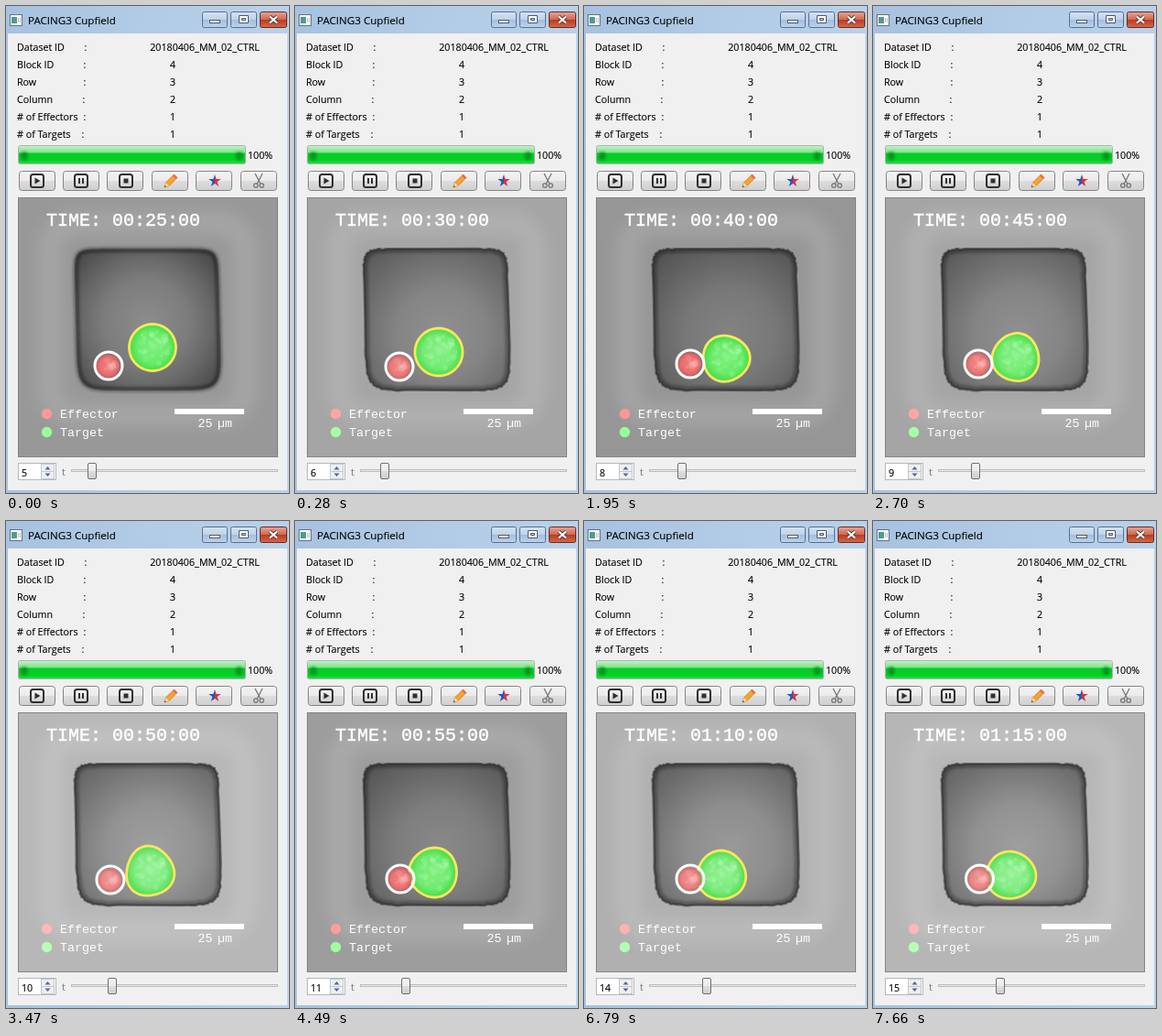
Animation, 309 px wide and 532 px high, one loop 8 s. Source, as an HTML page:

```html
<!DOCTYPE html>
<html lang="en">
<head>
<meta charset="utf-8">
<title>Cell viewer</title>
<style>
  html, body { margin: 0; width: 100%; height: 100%; overflow: hidden; background: #b3cbe6; }
  svg { display: block; }
  .ui { font: 10.7px "Open Sans", "Noto Sans", sans-serif; fill: #000; stroke: #000; stroke-width: .12; }
  .mono { font: 13.3px "Liberation Mono", "Courier New", monospace; fill: #fff; }
  .mid { text-anchor: middle; }
</style>
</head>
<body>
<svg id="stage" width="309" height="532" viewBox="0 0 309 532">
  <defs>
    <linearGradient id="bar"><stop stop-color="#a6c2e0"/><stop offset=".5" stop-color="#b2cbe6"/><stop offset="1" stop-color="#b9d1ea"/></linearGradient>
    <linearGradient id="cap" x2="0" y2="1"><stop stop-color="#d5e3f2"/><stop offset=".48" stop-color="#bfd2e8"/><stop offset=".5" stop-color="#a3bddb"/><stop offset="1" stop-color="#bcd3ec"/></linearGradient>
    <linearGradient id="close" x2="0" y2="1"><stop stop-color="#e3a596"/><stop offset=".48" stop-color="#cf6a53"/><stop offset=".5" stop-color="#b93a20"/><stop offset="1" stop-color="#d3694a"/></linearGradient>
    <linearGradient id="btn" x2="0" y2="1"><stop stop-color="#f3f3f3"/><stop offset=".48" stop-color="#ebebeb"/><stop offset=".5" stop-color="#dddddd"/><stop offset="1" stop-color="#cfcfcf"/></linearGradient>
    <linearGradient id="fill" x2="0" y2="1"><stop stop-color="#c4f3c9"/><stop offset=".38" stop-color="#7ce388"/><stop offset=".42" stop-color="#06cb25"/><stop offset=".8" stop-color="#04d127"/><stop offset="1" stop-color="#2fda4b"/></linearGradient>
    <radialGradient id="sharp" gradientUnits="userSpaceOnUse" cx="160" cy="358" r="122"><stop stop-opacity=".13"/><stop offset=".4" stop-opacity=".2"/><stop offset=".7" stop-opacity=".34"/><stop offset="1" stop-opacity=".48"/></radialGradient>
    <radialGradient id="soft" gradientUnits="userSpaceOnUse" cx="153" cy="345" r="102"><stop stop-opacity=".08"/><stop offset=".45" stop-opacity=".18"/><stop offset=".7" stop-opacity=".32"/><stop offset="1" stop-opacity=".52"/></radialGradient>
    <radialGradient id="red"><stop id="redIn"/><stop offset=".7" id="redMid"/><stop offset="1" id="redOut"/></radialGradient>
    <radialGradient id="green"><stop id="greenIn"/><stop offset=".7" id="greenMid"/><stop offset="1" id="greenOut"/></radialGradient>
    <filter id="blur" x="-20%" y="-20%" width="140%" height="140%"><feGaussianBlur stdDeviation="8"/></filter>
    <filter id="haze" x="-20%" y="-20%" width="140%" height="140%"><feGaussianBlur stdDeviation="1.6"/></filter>
    <filter id="fuzz" x="-20%" y="-20%" width="140%" height="140%"><feGaussianBlur stdDeviation=".7"/></filter>
    <clipPath id="view"><rect x="14" y="210" width="282" height="282"/></clipPath>
    <clipPath id="inside"><path id="cut"/></clipPath>
  </defs>

  <!-- window -->
  <rect width="309" height="532" fill="url(#bar)"/>
  <rect x="2" y="30" width="305" height="499" fill="#f0f0f0"/>
  <rect x="4.5" y="9.5" width="13" height="12" fill="#fdfdfd" stroke="#66707a"/>
  <rect x="6" y="12" width="6" height="7" fill="#4f9a94"/>
  <path d="M13.500 13v5M15.500 13v5" stroke="#b4bcc4"/>
  <text class="ui" x="24" y="20" style="font-size:11.6px">PACING3 Cupfield</text>
  <g stroke="#56708d">
    <rect x="214.5" y="6.5" width="27" height="17" rx="2" fill="url(#cap)"/>
    <rect x="245.5" y="6.5" width="28" height="17" rx="2" fill="url(#cap)"/>
    <rect x="277.5" y="6.5" width="29" height="17" rx="2" fill="url(#close)" stroke="#6b2a20"/>
  </g>
  <rect x="222.5" y="15.5" width="11" height="3" fill="#fff" stroke="#4d5a68"/>
  <path d="M254.500 10.500h10v8h-10zM257.500 13.500h4v2h-4z" fill="#fff" fill-rule="evenodd" stroke="#4d5a68"/>
  <path d="M288 11.500l8 7m0-7l-8 7" stroke="#5b3030" stroke-width="4"/>
  <path d="M288 11.500l8 7m0-7l-8 7" stroke="#fff" stroke-width="2.300"/>

  <g id="info"></g>

  <!-- progress -->
  <rect x="13.500" y="152.500" width="248" height="20" rx="2" fill="url(#fill)" stroke="#b2b2b2"/>
  <g fill="#067d18" opacity=".65" filter="url(#haze)">
    <ellipse cx="20" cy="164" rx="4" ry="5"/><ellipse cx="254.500" cy="164" rx="4" ry="5"/>
  </g>
  <text class="ui" x="264" y="167">100%</text>

  <g id="buttons"></g>
  <g fill="none" stroke="#303030" stroke-width="2">
    <rect x="27" y="184" width="14" height="14" rx="2.500"/>
    <rect x="75" y="184" width="14" height="14" rx="2.500"/>
    <rect x="124" y="184" width="14" height="14" rx="2.500"/>
  </g>
  <path d="M31.500 187.500l6 3.500-6 3.500zM79 188h2v6h-2zM83 188h2v6h-2zM128.500 188.500h5v5h-5z" fill="#303030"/>
  <path d="M173 198l1.500-5 9-9 3.500 3.500-9 9z" fill="#f5a42c" stroke="#c9751a" stroke-width=".8"/>
  <path d="M182 185.500l1.500-1.500 3.500 3.500-1.500 1.500z" fill="#e8685a"/>
  <path d="M173 198l1.500-5 3.500 3.500z" fill="#f3d9a8"/>
  <path d="M173 198l.600-2 1.400 1.400z" fill="#333"/>
  <path d="M228 184l1.600 5h5.200l-4.200 3.100 1.600 5-4.200-3.100z" fill="#d8323c"/>
  <path d="M228 184l-1.600 5h-5.200l4.200 3.100-1.600 5 4.200-3.100z" fill="#2457b8"/>
  <g fill="none" stroke="#777" stroke-width="1.300">
    <path d="M272 183l6 11.500M280 183l-6 11.500"/>
    <circle cx="272.800" cy="196" r="2.200"/><circle cx="279.200" cy="196" r="2.200"/>
  </g>

  <!-- microscope view -->
  <rect x="13.500" y="209.500" width="283" height="283" fill="#999" stroke="#858585"/>
  <g clip-path="url(#view)">
    <rect id="field" x="14" y="210" width="282" height="282"/>
    <rect x="48" y="237" width="213" height="210" rx="28" fill="none" stroke="#fff" stroke-opacity=".12" stroke-width="26" filter="url(#blur)"/>
    <path id="well"/>
    <g clip-path="url(#inside)">
      <path id="shade" fill="none" stroke="#000" stroke-opacity=".28" stroke-width="9" filter="url(#haze)"/>
    </g>
    <path id="edge" fill="none" stroke="#262626"/>
    <g id="target">
      <path id="tbody" fill="url(#green)"/>
      <g id="tspots" fill="#d5ffd5" filter="url(#fuzz)"></g>
      <path id="tring" fill="none" stroke="#f7e85c" stroke-width="2.800"/>
    </g>
    <g id="effector">
      <circle r="12.800" cx="-.5" cy=".3" fill="url(#red)"/>
      <g id="espots" fill="#ffd0d0" filter="url(#fuzz)"></g>
      <circle r="15" fill="none" stroke="#fff" stroke-width="3"/>
    </g>
    <circle id="edot" cx="44.500" cy="445.500" r="5.700"/>
    <circle id="tdot" cx="44.500" cy="465.500" r="5.700"/>
    <text class="mono" x="59" y="450">Effector</text>
    <text class="mono" x="59" y="470">Target</text>
    <rect x="184" y="440" width="76" height="6" fill="#fff"/>
    <text class="mono" x="209.500" y="460">25</text><text class="mono" x="231" y="460">µm</text>
    <text class="mono" id="clock" x="44" y="240" style="font-size:20px;stroke:#fff;stroke-width:.45"></text>
  </g>

  <!-- frame spinner and slider -->
  <rect x="13.500" y="499.500" width="41" height="18" fill="#fff" stroke="#b4b8be"/>
  <g fill="#efefef" stroke="#c3c7cc"><rect x="38.500" y="500.500" width="14" height="8"/><rect x="38.500" y="508.500" width="14" height="8"/></g>
  <path d="M42.500 506.500l3-3.500 3 3.500zM42.500 510.500l3 3.500 3-3.500z" fill="#5068a0"/>
  <text class="ui" id="count" x="17" y="513.500"></text>
  <text class="ui" x="61" y="513" style="fill:#66758c;stroke:none">t</text>
  <rect x="71.500" y="506.500" width="225" height="2" fill="#e7eaea" stroke="#bcbcbc"/>
  <rect id="thumb" y="499.500" width="9" height="17" rx="1.500" fill="url(#btn)" stroke="#6e6e6e"/>
</svg>
<script>
const $ = id => document.getElementById(id);
const set = (id, attrs) => { for (const k in attrs) $(id).setAttribute(k, attrs[k]); };
const LOOP = 8000, FIRST = 5;

// start ms, field grey, effector x y, target x y rx ry, lobe size, lobe angle
const STEPS = [
  [0,    152, 112, 393, 160, 373, 25.5, 25.5, 0, 0],
  [280,  165, 114, 394, 157, 378, 26, 26, 0, 0],
  [1060, 173, 116, 395, 154, 382, 26.5, 26.5, 0, 0],
  [1950, 150, 116, 391, 155, 385, 25.5, 25, .03, 2],
  [2700, 165, 115, 391, 156, 384, 25.5, 26, .03, .8],
  [3470, 183, 114, 392, 157, 383, 26, 27, .045, .3],
  [4490, 157, 115, 391, 151, 384, 26, 27, .02, 1.05],
  [5340, 190, 115, 391, 149.5, 386.5, 25, 28, .015, .8],
  [6050, 180, 115, 391, 150, 387, 26, 27, .02, .6],
  [6790, 176, 116, 391, 150, 387, 26.5, 26.5, .02, .4],
  [7660, 182, 116.5, 391, 150.5, 387, 27, 25.7, .02, .2]
];

function random(seed) {
  return () => (seed = (seed * 16807) % 2147483647) / 2147483647;
}

function closedPath(n, point) {
  const pts = Array.from({ length: n }, (_, i) => point(i / n * 2 * Math.PI).map(v => v.toFixed(2)));
  return "M" + pts.join("L") + "Z";
}

// Sheared superellipse, rounder at the bottom, with a wavy border.
function wellPath(rough) {
  return closedPath(240, a => {
    const c = Math.cos(a), s = Math.sin(a), p = s > 0 ? .27 : .18;
    const pow = v => Math.sign(v) * Math.abs(v) ** p;
    const k = 1 + rough * (Math.sin(23 * a) + Math.sin(41 * a + 1)), y = pow(s);
    return [154.8 + y * 2 + pow(c) * 78.5 * k, 342.6 + y * 77.3 * k];
  });
}

function lobePath(rx, ry, size, angle) {
  return closedPath(60, a => {
    const k = 1 + size * Math.cos(3 * (a - angle));
    return [rx * k * Math.cos(a), ry * k * Math.sin(a)];
  });
}

function spots(seed, n, radius) {
  const rnd = random(seed);
  let out = "";
  for (let i = 0; i < n; i++) {
    const a = rnd() * 6.283, d = Math.sqrt(rnd()) * radius;
    out += `<circle cx="${d * Math.cos(a)}" cy="${d * Math.sin(a)}" r="${1.5 + rnd() * 2.5}" opacity="${.08 + rnd() * .16}"/>`;
  }
  return out;
}

const INFO = [
  ["Dataset ID", "20180406_MM_02_CTRL", 87], ["Block ID", "4", 86], ["Row", "3", 86],
  ["Column", "2", 85], ["# of Effectors", "1", 86], ["# of Targets", "1", 84]
];
$("info").innerHTML = INFO.map(([label, value, colon], i) => {
  const y = 49 + i * 19;
  return `<text class="ui" x="12" y="${y}">${label}</text><text class="ui mid" x="${colon}" y="${y}">:</text>` +
    `<text class="ui mid" x="${i ? 182 : 217}" y="${y}">${value}</text>`;
}).join("");

$("buttons").innerHTML = Array.from({ length: 6 }, (_, i) =>
  `<rect x="${Math.floor(14 + i * 48.4) + .5}" y="180.5" width="39" height="21" rx="3" fill="url(#btn)" stroke="#858585"/>`
).join("");

$("tspots").innerHTML = spots(7, 34, 19);
$("espots").innerHTML = spots(19, 12, 8);

const grey = v => `rgb(${v},${v},${v})`;
const two = v => String(v).padStart(2, "0");

// Stain colours follow the brightness of the field.
function stain(level) {
  const red = (r, k) => ({ "stop-color": `rgb(${r},${level * k},${level * k})` });
  const green = (g, k) => ({ "stop-color": `rgb(${level * k},${g},${level * k})` });
  set("redIn", red(240, .82));
  set("redMid", red(234, .74));
  set("redOut", red(212, .62));
  set("greenIn", green(240, .82));
  set("greenMid", green(235, .7));
  set("greenOut", green(222, .48));
  set("edot", { fill: `rgb(255,${level},${level})` });
  set("tdot", { fill: `rgb(${level},255,${level})` });
}

function show(i) {
  const [, level, ex, ey, tx, ty, rx, ry, size, angle] = STEPS[i];
  const n = FIRST + i, min = n * 5, soft = i === 0, well = wellPath(soft ? 0 : .0035);
  set("field", { fill: grey(level) });
  set("well", { d: well, fill: soft ? "url(#soft)" : "url(#sharp)", filter: soft ? "url(#haze)" : "none" });
  set("cut", { d: well });
  set("shade", { d: well });
  set("edge", {
    d: well, "stroke-width": soft ? 4 : 2.6, "stroke-opacity": soft ? .3 : .55,
    filter: soft ? "url(#haze)" : "url(#fuzz)"
  });
  set("target", { transform: `translate(${tx} ${ty})` });
  set("tbody", { d: lobePath(rx - 1, ry - 1, size, angle) });
  set("tring", { d: lobePath(rx, ry, size, angle) });
  set("effector", { transform: `translate(${ex} ${ey})` });
  stain(level);
  set("thumb", { x: Math.floor(89 + i * 4.5) + .5 });
  $("clock").textContent = `TIME: ${two(Math.floor(min / 60))}:${two(min % 60)}:00`;
  $("count").textContent = n;
}

let current = -1;
const start = performance.now();
function tick() {
  const t = (performance.now() - start) % LOOP;
  const i = STEPS.findLastIndex(s => s[0] <= t);
  if (i !== current) show(current = i);
  requestAnimationFrame(tick);
}
tick();
</script>
</body>
</html>
```
